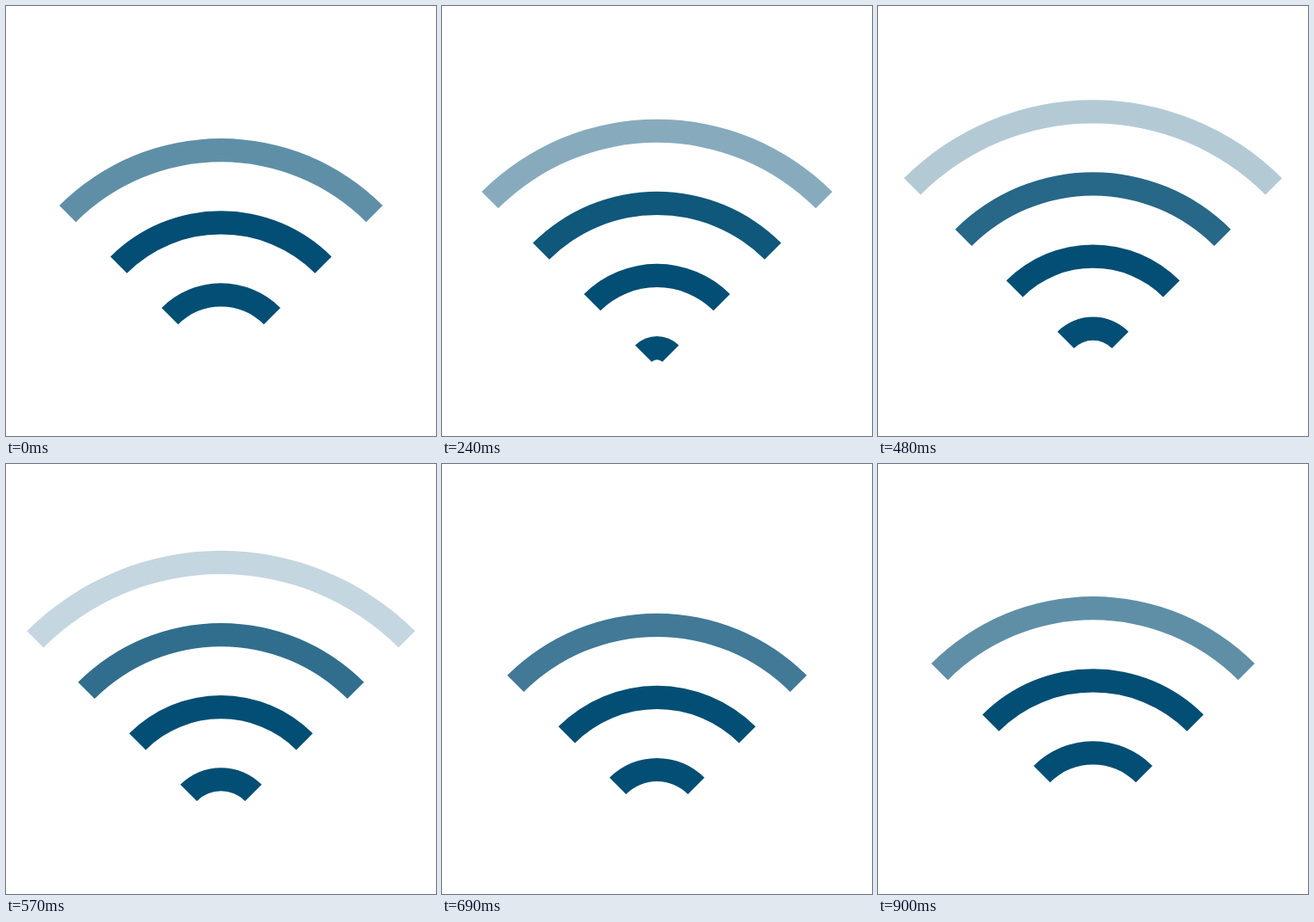
An HTML page that plays this animation: 500 by 500 pixels, repeating every 930 ms.

```html
<!DOCTYPE html>
<html lang="en">
<head>
<meta charset="utf-8">
<title>Signal waves</title>
<style>
  html, body { margin: 0; width: 100%; height: 100%; overflow: hidden; background: #fff; }
  svg { display: block; width: 100%; height: 100%; }
</style>
</head>
<body>
<svg viewBox="0 0 500 500" fill="#034e74"></svg>
<script>
const LOOP = 930, STEP = 30, PERIOD = 900;
const SPACING = 84.1, HALF = 13.6;
const FADE_START = 1800, FADE_SPAN = 1750, LIFE = 3375;
const CX = 250, CY = 420;

const svg = document.querySelector('svg');
const waves = [0, 1, 2, 3].map(() =>
  svg.appendChild(document.createElementNS('http://www.w3.org/2000/svg', 'path')));

// Quarter ring opening upwards
function band(outer, inner) {
  const a = outer * Math.SQRT1_2, b = inner * Math.SQRT1_2;
  return `M${CX - a} ${CY - a}A${outer} ${outer} 0 0 1 ${CX + a} ${CY - a}` +
         `L${CX + b} ${CY - b}A${inner} ${inner} 0 0 0 ${CX - b} ${CY - b}Z`;
}

function opacity(age) {
  if (age > LIFE) return 0;
  const u = Math.max(0, age - FADE_START) / FADE_SPAN;
  return 1 - u ** 1.5;
}

function draw(time) {
  const t = Math.floor((time % LIFE_LOOP()) / STEP) * STEP % PERIOD;
  waves.forEach((wave, i) => {
    const age = t + i * PERIOD;
    const r = SPACING * age / PERIOD;
    // A newborn wave is hollow until its radius exceeds half the stroke
    wave.setAttribute('d', age ? band(r + HALF, Math.abs(r - HALF)) : '');
    wave.setAttribute('fill-opacity', opacity(age));
  });
}

function LIFE_LOOP() { return LOOP; }

function tick() {
  draw(performance.now() - start);
  requestAnimationFrame(tick);
}

const start = performance.now();
tick();
</script>
</body>
</html>
```
